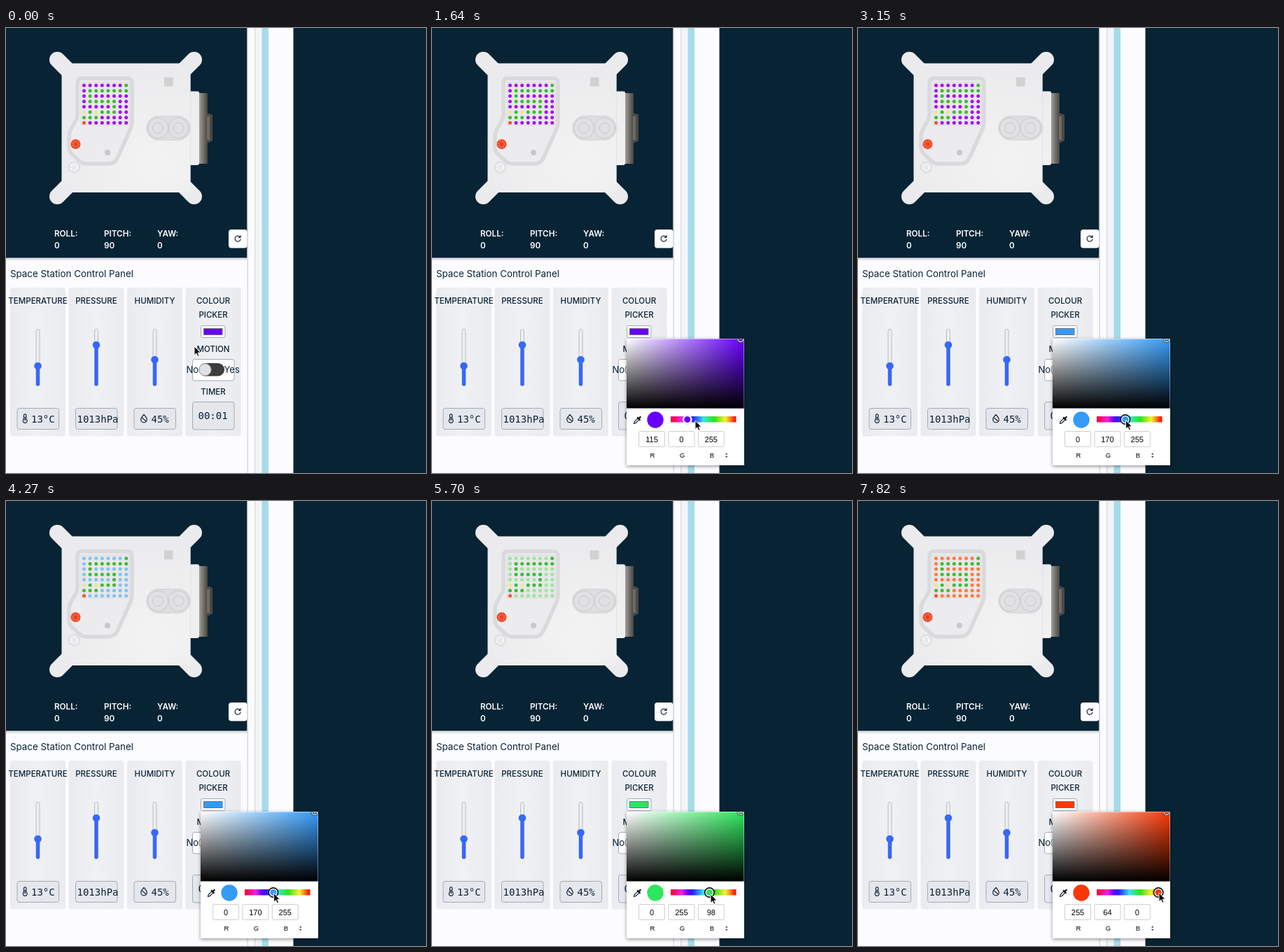
Recreate the animation shown at these times as an HTML page. Size 600 by 636 pixels, loop 7.85 s.

```html
<!DOCTYPE html>
<html lang="en">
<head>
<meta charset="utf-8">
<title>Space Station Control Panel</title>
<style>
html, body { margin: 0; width: 100%; height: 100%; overflow: hidden; background: #082334; }
svg { display: block; width: 100vw; height: 100vh; font-family: Inter, "Open Sans", sans-serif; fill: #0b2237; }
.mono { font: 14px "DejaVu Sans Mono", monospace; }
.label { font-size: 11.5px; font-weight: 500; text-anchor: middle; }
.pose { font-size: 11.7px; font-weight: 600; fill: #fff; }
.field { font: 11px "Liberation Sans", Arial, sans-serif; fill: #000; text-anchor: middle; }
.box { fill: #e4e7ec; stroke: #a3a9b7; }
.icon { fill: none; stroke: #17263a; stroke-width: 1.2; stroke-linecap: round; stroke-linejoin: round; }
</style>
</head>
<body>
<svg id="stage" viewBox="0 0 600 636" preserveAspectRatio="none">
  <defs>
    <radialGradient id="body" cx=".68" cy=".78" r=".75">
      <stop stop-color="#f3f3f4"/><stop offset="1" stop-color="#ebebed"/>
    </radialGradient>
    <linearGradient id="metal">
      <stop stop-color="#a9a6a3"/><stop offset=".5" stop-color="#77736f"/><stop offset="1" stop-color="#47443f"/>
    </linearGradient>
    <linearGradient id="card">
      <stop stop-color="#e9ebef"/><stop offset=".5" stop-color="#f0f1f4"/><stop offset="1" stop-color="#e9ebef"/>
    </linearGradient>
    <linearGradient id="sat">
      <stop stop-color="#fff"/><stop offset="1" id="satEnd"/>
    </linearGradient>
    <linearGradient id="dark" x2="0" y2="1">
      <stop stop-color="#000" stop-opacity="0"/><stop offset="1"/>
    </linearGradient>
    <linearGradient id="hues"></linearGradient>
    <filter id="shadow" x="-15%" y="-15%" width="130%" height="130%">
      <feDropShadow dx="0" dy="1.500" stdDeviation="2.800" flood-opacity=".42"/>
    </filter>
    <clipPath id="satClip"><path d="M278 444.500h167.500v99H278z"/></clipPath>
  </defs>

  <!-- page columns -->
  <path fill="#082334" d="M0 0h600v636H0z"/>
  <path fill="#fcfcfe" d="M0 332h345v304H0zM344.500 0h66v636h-66z"/>
  <path fill="#e3e4e6" d="M0 328.500h345v3.500H0z"/>
  <path fill="#d9dade" d="M344.500 0h1.500v636h-1.500zM355 0h1.500v636H355z"/>
  <path fill="#f3f4f7" d="M357 0h9v636h-9z"/>
  <path fill="#a5dcea" d="M365.500 0h9.500v636h-9.500z"/>

  <!-- board -->
  <g id="board">
    <path d="M73.300 45.300L268.700 240.700M268.700 45.300L73.300 240.700" stroke="#ebebed" stroke-width="22.600" stroke-linecap="round"/>
    <path fill="url(#metal)" d="M275 93h13v101h-13z"/>
    <path fill="#4b4845" d="M287 121l8 3v37l-8 4z"/>
    <path fill="#6f6b67" d="M287 126h4v34h-4z"/>
    <path fill="url(#body)" d="M81.500 50.500H261.700q2 0 2 2V90.500h10.300q2 0 2 2V193q0 3-3 3h-9.300V233q0 2-2 2H81.500q-2 0-2-2V52.500q0-2 2-2z"/>
    <path d="M263.700 91v105" stroke="#dededf" stroke-width=".8"/>
    <path d="M108 72H173q7 0 7 7V135q0 5-2 9L160 184q-4 10-14 10H115q-6 0-10-4L94 180q-4-4-4-10V155q0-5 2-9L101 130q1-3 1-7V79q0-7 6-7z" fill="#ececee" stroke="#dadadd" stroke-width="5.500"/>
    <path fill="#e8e7e9" stroke="#dcdcde" d="M107 77.500h69v61.500h-69z"/>
    <path fill="#d1d1d2" d="M226 70.500h12.500v13H226z"/>
    <rect x="201" y="126" width="62" height="34" rx="17" fill="#dedee0" stroke="#cfcfd1"/>
    <g fill="#e1e1e3" stroke="#c9c9cb">
      <circle cx="217" cy="143" r="14.500"/><circle cx="246.500" cy="143" r="14.500"/>
      <circle cx="217" cy="143" r="7.500"/><circle cx="246.500" cy="143" r="7.500"/>
    </g>
    <circle cx="145" cy="178" r="4" fill="#c8c8ca"/>
    <g fill="none" stroke="#d6d6d8">
      <circle cx="97.500" cy="199" r="8" fill="#e8e8ea"/>
      <circle cx="97.500" cy="199" r="4.500" stroke-width="2" stroke-dasharray="3 2" stroke="#fafafa"/>
    </g>
    <circle cx="99.500" cy="166" r="7" fill="#ef4826"/>
    <circle cx="99.500" cy="166" r="4" fill="none" stroke="#fb8065" stroke-width="2.500" stroke-dasharray="1.200 1.940"/>
    <circle cx="99.500" cy="166" r="1.800" fill="#e43a1a"/>
    <g id="leds"></g>
  </g>

  <g class="pose">
    <text x="69" y="298">ROLL:</text><text x="69" y="315">0</text>
    <text x="140" y="298">PITCH:</text><text x="140" y="315">90</text>
    <text x="216" y="298">YAW:</text><text x="216" y="315">0</text>
  </g>
  <rect x="318" y="288" width="26.500" height="26.500" rx="4" fill="#fff"/>
  <path class="icon" d="M334.300 298.700A4 4 0 1 0 335 302M335 296.500v2.800h-2.800"/>

  <text x="6" y="356" font-size="13.350">Space Station Control Panel</text>
  <g id="cards"></g>

  <!-- colour, motion and timer card -->
  <g class="label">
    <text x="296" y="394">COLOUR</text><text x="296" y="414">PICKER</text>
    <text x="296" y="463">MOTION</text><text x="296" y="524">TIMER</text>
  </g>
  <rect x="278.500" y="425.500" width="34.500" height="17" rx="2" fill="#fff" stroke="#a3a9b7"/>
  <rect id="swatch" x="282.500" y="429.500" width="26.500" height="9" stroke="#717178"/>
  <rect x="266.500" y="473.500" width="59.500" height="30.500" rx="3" fill="#fff" stroke="#a3a9b7"/>
  <rect x="276" y="479" width="36" height="18.500" rx="9.250" fill="#3d3d3d"/>
  <circle cx="284.500" cy="488.300" r="8.700" fill="#dfe1e6" stroke="#777" stroke-width=".7"/>
  <text x="257.500" y="493" font-size="13">No</text><text x="311.500" y="493" font-size="13">Yes</text>
  <rect class="box" x="266.500" y="534.500" width="59.500" height="39.500" rx="3"/>
  <text class="mono" x="274.500" y="559">00:01</text>

  <!-- colour picker -->
  <g id="picker">
    <path filter="url(#shadow)" fill="#fff" d="M278 444h168v181H278z"/>
    <path fill="url(#sat)" d="M278 444.500h167.500v99H278z"/>
    <path fill="url(#dark)" d="M278 444.500h167.500v99H278z"/>
    <g clip-path="url(#satClip)" fill="none">
      <circle cx="441" cy="444.500" r="4" stroke="#222" stroke-width="2.800"/>
      <circle cx="441" cy="444.500" r="4" stroke="#fff" stroke-width="1.300"/>
    </g>
    <path d="M288.500 565.500l.8-3 4.700-4.700 2 2-4.700 4.700z" class="icon"/>
    <path d="M293.800 557l3 3M295.600 558l2-2" stroke="#111" stroke-width="2.400" stroke-linecap="round"/>
    <circle id="chip" cx="319" cy="560" r="11.700"/>
    <path fill="url(#hues)" d="M341 555h93.500v8.500H341z"/>
    <g id="handle"><circle id="ring" r="6.700" fill="#fff"/><circle id="dot" r="4.500"/></g>
    <g id="fields"></g>
    <path d="M419 609.500l1.700-2 1.700 2zM419 612l1.700 2 1.700-2z" fill="#222"/>
  </g>

  <path id="cursor" d="M0 0V12.500L2.900 9.900L4.900 14.300L7 13.400L5.100 9.100H9z" fill="#111" stroke="#fff" stroke-width=".9"/>
</svg>
<script>
const LOOP = 7850;
const $ = id => document.getElementById(id);

// Screen colour by hue: [degrees, r, g, b]
const SHADES = [
  [0, 250, 10, 20], [15, 249, 56, 7], [35, 245, 148, 34], [60, 250, 240, 50],
  [120, 50, 225, 30], [143, 44, 230, 92], [180, 60, 226, 240], [200, 52, 155, 248],
  [240, 36, 30, 250], [267, 102, 0, 255], [300, 240, 30, 230], [360, 250, 0, 40]
];
// [ms, hue]
const HUE_KEYS = [
  [0, 267.06], [1900, 267.06], [1901, 222], [2450, 200], [4450, 200],
  [5200, 143.06], [5900, 143.06], [6550, 35.06], [6700, 15.06]
];
// [ms, x, y]
const CURSOR_KEYS = [
  [0, 269, 455], [350, 294, 434], [700, 296, 436], [1500, 376, 561], [1900, 376, 561],
  [2400, 382.5, 560.5], [4400, 382.5, 560.5], [5150, 398, 562], [5850, 398, 562],
  [6500, 429, 560], [7000, 430, 560]
];
const LED_STEPS = [
  [0, '#a512f2'], [3500, '#80c4f4'], [4900, '#9ce6a0'], [6100, '#f0e878'], [7000, '#ff7a3c']
];
const LED_ROWS = [
  '.......g', '.ggggggg', '.g......', '.ggggg..',
  '.....g..', 'ygyggg..', 'ggg.....', 'r.......'
];
const LED_FIXED = { g: '#3cbc35', y: '#f3e29a', r: '#f4512c' };

const smooth = p => p * p * (3 - 2 * p);

function sample(keys, at, ease = p => p) {
  const i = keys.findIndex(k => k[0] > at);
  if (i < 0) return keys[keys.length - 1].slice(1);
  if (i === 0) return keys[0].slice(1);
  const a = keys[i - 1], b = keys[i];
  const p = ease((at - a[0]) / (b[0] - a[0]));
  return a.slice(1).map((v, n) => v + (b[n + 1] - v) * p);
}

const shade = hue => `rgb(${sample(SHADES, hue).map(Math.round)})`;
const hueAt = t => sample(HUE_KEYS, t, smooth)[0];

function hueToRgb(hue) {
  return [5, 3, 1].map(n => {
    const k = (n + hue / 60) % 6;
    return Math.round(255 * (1 - Math.max(0, Math.min(k, 4 - k, 1))));
  });
}

function sliderCard(x, title, y, value, textX, icon) {
  const mid = x + 39.5;
  return `<text class="label" x="${mid}" y="394">${title}</text>
    <rect x="${mid - 2.5}" y="430.500" width="5" height="80.500" rx="2" fill="#eceef1" stroke="#b9bcc3"/>
    <rect x="${mid - 2.6}" y="${y}" width="5.200" height="${511.5 - y}" rx="2" fill="#3568fb"/>
    <circle cx="${mid}" cy="${y}" r="5.300" fill="#3568fb"/>
    <rect class="box" x="${x + 10}" y="543.500" width="59.500" height="30" rx="3"/>
    ${icon}<text class="mono" x="${textX}" y="564">${value}</text>`;
}

const thermometer = `<path class="icon" d="M25.500 559v-5.500a1.700 1.700 0 0 1 3.400 0V559a3 3 0 1 1-3.400 0zM27.200 556v5"/>`;
const droplet = `<path class="icon" d="M197 552.500c2.500 2.700 4.300 4.800 4.300 7a4.300 4.300 0 0 1-8.600 0c0-2.200 1.800-4.300 4.300-7zM195 557.500l4.500 4"/>`;

$('cards').innerHTML =
  [6, 89.5, 173, 256.5].map(x =>
    `<rect x="${x}" y="371" width="79" height="212.500" rx="4" fill="url(#card)"/>`).join('') +
  sliderCard(6, 'TEMPERATURE', 483, '13°C', 36, thermometer) +
  sliderCard(89.5, 'PRESSURE', 453, '1013hPa', 101.5, '') +
  sliderCard(173, 'HUMIDITY', 474, '45%', 207.5, droplet);

$('leds').innerHTML = LED_ROWS.map((row, j) => [...row].map((c, i) =>
  `<circle cx="${111.5 + i * 8.6}" cy="${82 + j * 7.65}" r="2.500"${c === '.' ? '' : ` fill="${LED_FIXED[c]}"`}/>`
).join('')).join('');

$('hues').innerHTML = [...SHADES].reverse().map(([h]) =>
  `<stop offset="${1 - h / 360}" stop-color="${shade(h)}"/>`).join('');

$('fields').innerHTML = [...'RGB'].map((c, i) => {
  const x = 314 + i * 42.4;
  return `<rect x="${x - 18.5}" y="576.500" width="37" height="22" rx="1.500" fill="#fff" stroke="#cfcfd2"/>
    <text class="field" x="${x}" y="591.500" id="value${i}"></text>
    <text class="field" x="${x + 1}" y="614" style="font-size:9.500px">${c}</text>`;
}).join('');

function draw(t) {
  const hue = hueAt(t), color = shade(hue);
  const [x, y] = sample(CURSOR_KEYS, t, smooth);
  $('cursor').setAttribute('transform', `translate(${x} ${y})`);
  $('picker').style.display = t < 500 ? 'none' : '';
  $('handle').setAttribute('transform', `translate(${341 + (1 - hue / 360) * 92} 559.5)`);
  $('ring').setAttribute('stroke', t < 1900 ? '#c9c9cc' : '#111');
  $('ring').setAttribute('stroke-width', t < 1900 ? .6 : 1.7);
  for (const id of ['chip', 'dot']) $(id).setAttribute('fill', color);
  $('satEnd').setAttribute('stop-color', color);
  $('swatch').setAttribute('fill', shade(hueAt(t - 60)));
  $('leds').setAttribute('fill', LED_STEPS.filter(s => s[0] <= t).pop()[1]);
  hueToRgb(hue).forEach((v, i) => { $('value' + i).textContent = v; });
}

const start = performance.now();
function tick() {
  draw((performance.now() - start) % LOOP);
  requestAnimationFrame(tick);
}
tick();
</script>
</body>
</html>
```
